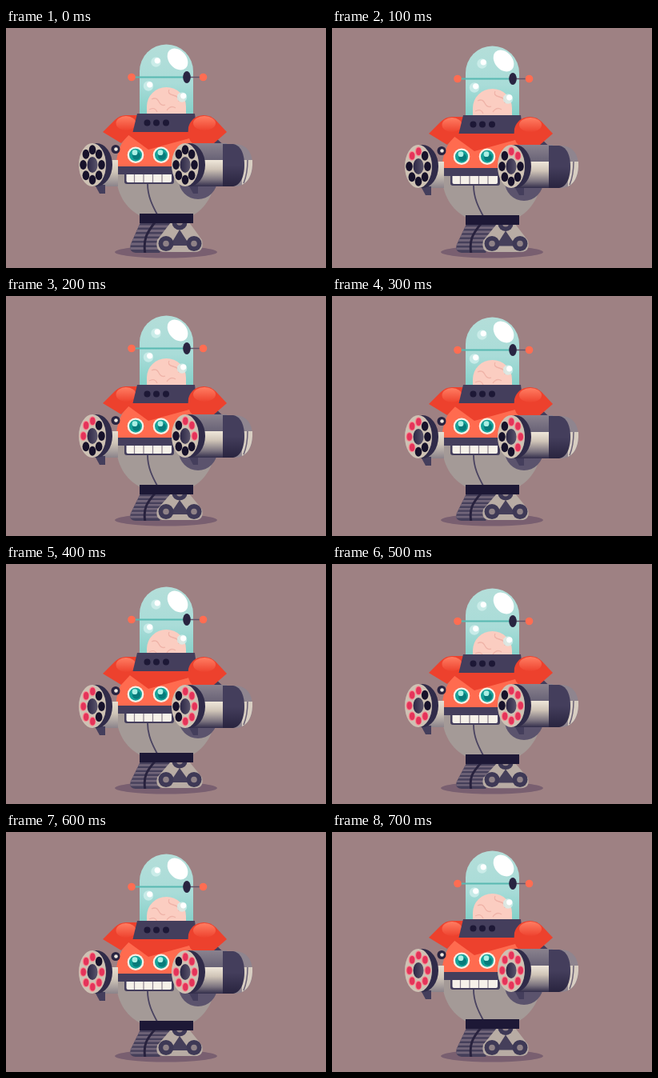
Recreate the animation shown at these times as an HTML page. Size 400x300 px, loop 800 ms.

```html
<!DOCTYPE html>
<html>
<head>
<meta charset="utf-8">
<style>
html, body { margin: 0; width: 100%; height: 100%; overflow: hidden; background: #9e8183; }
svg { display: block; width: 400px; height: 300px; }
</style>
</head>
<body>
<svg viewBox="0 0 400 300">
  <defs>
    <linearGradient id="glass" x2="0" y2="1">
      <stop stop-color="#b4ded9"/><stop offset=".5" stop-color="#a9dcd8"/><stop offset="1" stop-color="#78cdc4"/>
    </linearGradient>
    <linearGradient id="ball" x2="0" y2="1">
      <stop stop-color="#ff7d62"/><stop offset="1" stop-color="#ee432f"/>
    </linearGradient>
    <linearGradient id="cream" x2="0" y2="1">
      <stop stop-color="#e6ded0"/><stop offset=".45" stop-color="#cfc5b8"/><stop offset="1" stop-color="#8b838a"/>
    </linearGradient>
    <linearGradient id="barrel" x2="0" y2="1">
      <stop stop-color="#efe7da"/><stop offset=".35" stop-color="#cfc4b7"/>
      <stop offset=".75" stop-color="#7a727e"/><stop offset="1" stop-color="#332e4b"/>
    </linearGradient>
    <linearGradient id="steel" x2="0" y2="1">
      <stop stop-color="#8a828e"/><stop offset="1" stop-color="#676175"/>
    </linearGradient>
    <linearGradient id="band" x2="0" y2="1">
      <stop stop-color="#443e5c"/><stop offset=".5" stop-color="#443e5c"/><stop offset="1" stop-color="#29243f"/>
    </linearGradient>
    <linearGradient id="hub">
      <stop stop-color="#2b2645"/><stop offset="1" stop-color="#5a546b"/>
    </linearGradient>
    <clipPath id="track"><path d="M168 243H206L192 281H162Q153 280 156 270Z"/></clipPath>
    <g id="bubble"><circle r="6.2" fill="#d3f0ed" opacity=".75"/><circle cx="1.7" cy="-1.7" r="3.6" fill="#fff"/></g>
    <g id="eye">
      <circle r="10.3" fill="#f5f1e6"/><circle r="8" fill="#16a39a"/>
      <circle cx="1" cy="1" r="5" fill="#087b7b"/><circle cx="-1" cy="-3" r="3.4" fill="#a9efe4"/>
    </g>
    <g id="wheel"><circle r="9.5" fill="#3e3956"/><circle r="3.8" fill="#8f8287"/></g>
  </defs>

  <ellipse cx="200" cy="280" rx="64" ry="7.5" fill="#795f70"/>
  <g id="feet">
    <g clip-path="url(#track)">
      <path d="M150 240h60v45h-60z" fill="#453f5a"/>
      <path d="M150 248h58M150 253.5h58M150 259h58M150 264.5h58M150 270h58M150 275.5h58" stroke="#716579" stroke-width="2.9"/>
      <path d="M186 243C176 256 171 264 174 283" fill="none" stroke="#28223e" stroke-width="3"/>
    </g>
    <path d="M206 243H229L245 265Q248 280 236 280H198Q186 280 189 265Z" fill="#b8aca4"/>
    <path d="M217 252L230 272H205Z" fill="#453f5a"/>
    <use href="#wheel" x="217" y="243"/>
  </g>
  <use href="#wheel" x="200" y="269.5"/><use href="#wheel" x="235" y="269.5"/>

  <g class="dome">
    <path d="M167 118V54A33.5 33.5 0 0 1 234 54V118Z" fill="url(#glass)"/>
    <path d="M176 116V98A24.5 24 0 0 1 225 98V116Z" fill="#fbcdc1"/>
    <path d="M182 89q6-3 9 3t8 4M204 77q-3 5 5 7t7 8M179 102q7-4 10 3M201 103q5-7 11-3" fill="none" stroke="#efb3a8" stroke-width="1.3"/>
    <path d="M157 61.5H226" stroke="#59b9b2" stroke-width="2"/>
    <path d="M226 61.5H246" stroke="#625569" stroke-width="1.5"/>
    <circle cx="157" cy="61.5" r="4.8" fill="#ff6d52"/><circle cx="246.5" cy="61.5" r="4.8" fill="#ff6d52"/>
    <ellipse cx="226" cy="61.5" rx="4.8" ry="7.6" fill="#292441"/>
    <ellipse cx="214.5" cy="39" rx="11" ry="15" fill="#fff" transform="rotate(-40 214.5 39)"/>
    <use href="#bubble" x="187.5" y="42.5"/><use href="#bubble" x="178" y="72.5"/><use href="#bubble" x="220" y="86.5"/>
  </g>

  <g class="body">
    <path d="M137 180H262C262 207 249 226 232 235H168C149 225 138 207 137 180Z" fill="#a49a97"/>
    <circle cx="240" cy="190" r="24" fill="#5b536d"/>
    <path d="M177 195C177 210 183 222 189 233" fill="none" stroke="#494260" stroke-width="1.8"/>
    <path d="M167 232H234V244H167Z" fill="#1d1836"/>
    <path d="M137 174C139 151 146 137 160 128H235C252 140 256 155 257 174Z" fill="#ff6b4f"/>
    <path d="M152 133L159 127H245L229 138L178 152Z" fill="#ed412d"/>
    <path d="M137 173H212V182H210V192Q210 195 207 195H151Q148 195 148 192V183H137Z" fill="#443e5c"/>
    <path d="M150.5 183H207V191Q207 193 205 193H152.5Q150.5 193 150.5 191Z" fill="#f6f1e9"/>
    <path d="M160.5 183v10M172 183v10M183.5 183v10M195 183v10" stroke="#8d8490" stroke-width="1.2"/>
    <use href="#eye" x="162" y="158.7"/><use href="#eye" x="194" y="158.7"/>
  </g>

  <g class="arms">
    <path d="M262 137L276 150L268 157L254 143Z" fill="#443e5c"/>
    <path d="M121 130L136 115Q142 109 150 109H166V128L155 132L144 144Z" fill="#ed412d"/>
    <ellipse cx="150" cy="119" rx="12.5" ry="9" fill="url(#ball)"/>
  </g>

  <g class="body">
    <path d="M164 107H236L239 130H158.5Z" fill="#443e5c"/>
    <g fill="#1d1836"><circle cx="176.5" cy="118.5" r="4"/><circle cx="188" cy="118.5" r="4"/><circle cx="200" cy="118.5" r="4"/></g>
  </g>

  <g class="arms" id="guns">
    <path d="M276 130L262 115Q256 109 247 109Q232 110 228 124Q226 138 233 144H260Z" fill="#ed412d"/>
    <ellipse cx="248" cy="119" rx="14" ry="9" fill="url(#ball)"/>
    <circle cx="137" cy="151.5" r="5.5" fill="#292441"/><circle cx="137.5" cy="151.5" r="2.3" fill="#eee6dd"/>
    <path d="M120 165H140V198H120Z" fill="url(#cream)"/>
    <path d="M111 196H124V207H117Z" fill="#443e5c"/>
    <path d="M228 196H240V207H234Z" fill="#443e5c"/>
    <path d="M285 145C302 145 308 157 308 171S302 198 285 198Z" fill="#8f858f"/>
    <path d="M294 165H308V171Q307 190 295 196Z" fill="#d8cec2"/>
    <path d="M229 144H276V166H229Z" fill="url(#steel)"/>
    <path d="M229 165H276V198H229Z" fill="url(#barrel)"/>
    <path d="M271 145H284C295 147 298 160 298 171S295 196 284 198H271Z" fill="url(#band)"/>
    <path d="M302 165Q302 182 297 194" fill="none" stroke="#6b6176" stroke-width="1.5"/>
  </g>
</svg>
<script>
const NS = "http://www.w3.org/2000/svg";
const $ = id => document.getElementById(id);
const bob = {
  dome: [0, 2, 4, 6, 8, 10, 7, 3],
  body: [0, 2, 4, 4, 4, 6, 4, 2],
  arms: [0, 2, 4, 5, 7, 6, 4, 2],
};

function oval(cx, cy, rx, ry, fill) {
  const e = document.createElementNS(NS, "ellipse");
  Object.entries({ cx, cy, rx, ry, fill }).forEach(([k, v]) => e.setAttribute(k, v));
  return $("guns").appendChild(e);
}

// Chambers are listed in lighting order, starting at the top.
function muzzle(x, dir) {
  oval(x + 5, 171, 20, 27, "#302b49");
  oval(x, 171, 17, 27, "#cec2b4");
  oval(x, 171, 6.5, 10, "url(#hub)");
  return Array.from({ length: 8 }, (_, i) => {
    const a = i * Math.PI / 4;
    const cx = x + dir * 11.5 * Math.sin(a), cy = 171 - 18.8 * Math.cos(a);
    return [oval(cx, cy, 4.3, 6, "#17122b"), oval(cx + 0.3, cy, 3.2, 4.8, "#17122b")];
  });
}

const muzzles = [muzzle(108, -1), muzzle(224, 1)];

function draw(now) {
  const step = Math.floor(now / 100) % 8;
  const lit = step ? step + 1 : 0;
  for (const part in bob)
    for (const g of document.getElementsByClassName(part))
      g.setAttribute("transform", `translate(0 ${bob[part][step]})`);
  const squash = 1 - bob.body[step] / 38;
  $("feet").setAttribute("transform", `translate(0 ${281 * (1 - squash)}) scale(1 ${squash})`);
  for (const holes of muzzles) holes.forEach(([rim, core], i) => {
    rim.setAttribute("fill", i < lit ? "#f58a90" : "#17122b");
    core.setAttribute("fill", i < lit ? "#e5335a" : "#17122b");
  });
  requestAnimationFrame(() => draw(performance.now() - start));
}
const start = performance.now();
draw(0);
</script>
</body>
</html>
```
